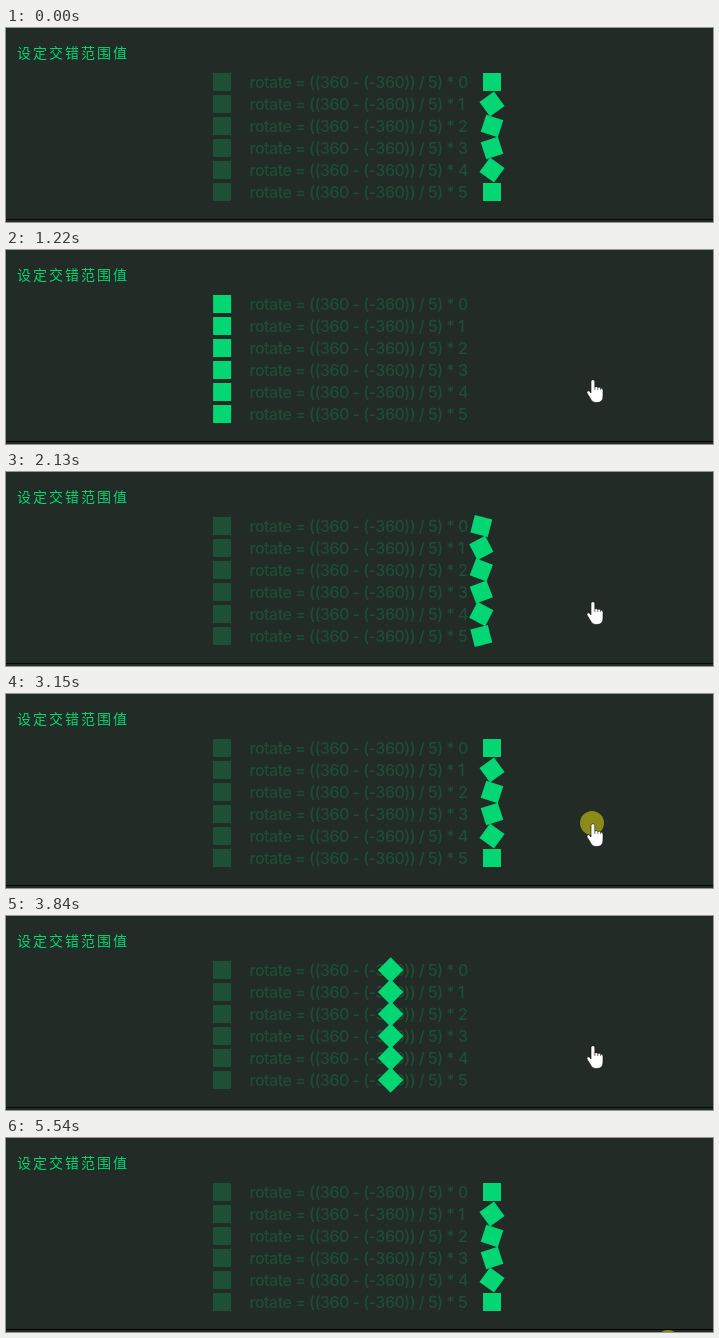
These frames come from a looping animation (707 px wide and 194 px high, 5610 ms). An HTML page:

```html
<!DOCTYPE html>
<html lang="zh">
<head>
<meta charset="utf-8">
<title>设定交错范围值</title>
<style>
  html, body { margin: 0; width: 100%; height: 100%; overflow: hidden; background: #222b26; }
  svg { display: block; }
  .title { font: 500 14px "Noto Sans CJK SC", "Noto Sans CJK", sans-serif; letter-spacing: 2px; fill: #02d773; }
  .label { font: 500 16px Inter, sans-serif; letter-spacing: -.5px; fill: #1e4d36; }
  .ghost { fill: #1d5037; }
  .box { fill: #02d773; }
</style>
</head>
<body>
<svg width="707" height="194" viewBox="0 0 707 194">
  <rect y="191" width="707" height="1" fill="#060806"/>
  <text class="title" x="11" y="30">设定交错范围值</text>
  <g id="rows"></g>
  <circle id="dot" r="12" fill="#8d8b18"/>
  <g id="hand" stroke="#111" stroke-width=".6" stroke-linejoin="round">
    <path fill="#fff" d="M-1 14V2.6a1.9 1.9 0 0 1 3.8 0V8q2-.8 3 .4 1.8-.6 2.8.6 2.4 0 2.4 2.2V17q0 6.5-6 6.5H3.5q-3 0-4.5-3L-5 14q-.6-2 1.2-2.2 1.4.1 2.8 2.2z"/>
    <path fill="none" d="M2.8 8v3M5.8 8.5v2.5M8.6 9v2"/>
  </g>
</svg>
<script>
const LOOP = 5610, STEP = 70, RUN = 1080, HOLD = 130, TRAVEL = 270;
const clicks = [{ at: 1090, delay: 112 }, { at: 3150, delay: 78 }];
const rest = [586, 129], away = [662, 204];
const get = id => document.getElementById(id);
const rows = get('rows'), dot = get('dot'), hand = get('hand');

const rowY = i => 54 + 22 * i;
const square = 'x="-9" y="-9" width="18" height="18"';
const each = make => Array.from({ length: 6 }, (_, i) => make(i)).join('');
rows.innerHTML =
  each(i => `<rect class="ghost" ${square} transform="translate(216 ${rowY(i)})"/>
    <text class="label" x="243.5" y="${rowY(i) + 6}">rotate = ((360 - (-360)) / 5) * ${i}</text>`) +
  each(() => `<rect class="box" ${square}/>`);
const boxes = rows.querySelectorAll('.box');

const easeInOut = p => p < .5 ? 2 * p * p : 1 - 2 * (1 - p) ** 2;
const place = (el, [x, y]) => el.setAttribute('transform', `translate(${x} ${y})`);
const show = (el, on) => el.setAttribute('visibility', on ? 'visible' : 'hidden');

function progress(t) {
  const click = clicks.findLast(c => t >= c.at + HOLD);
  if (!click) return 1;
  const steps = Math.floor((t - click.at - HOLD) / STEP);
  const p = (HOLD + steps * STEP - click.delay) / RUN;
  return easeInOut(Math.min(1, Math.max(0, p)));
}

function pointer(t) {
  if (t < 400 || t >= 4800) return away;
  if (t < 820) {
    const left = (1 - Math.floor((t - 400) / STEP) / 6) ** 2;
    return [rest[0] + 68 * left, rest[1] + 58 * left];
  }
  if (t < 4590) return rest;
  const gone = (1 + Math.floor((t - 4590) / STEP)) ** 2;
  return [rest[0] + 2.2 * gone, rest[1] + 6 * gone];
}

function draw(now) {
  const t = now % LOOP, p = progress(t), spot = pointer(t);
  boxes.forEach((box, i) => box.setAttribute('transform',
    `translate(${216 + TRAVEL * p} ${rowY(i)}) rotate(${(-360 + 144 * i) * p})`));
  place(hand, spot);
  place(dot, spot);
  show(dot, t >= 5540 || clicks.some(c => t >= c.at && t < c.at + HOLD));
}

const start = performance.now();
function tick() {
  draw(performance.now() - start);
  requestAnimationFrame(tick);
}
tick();
</script>
</body>
</html>
```
